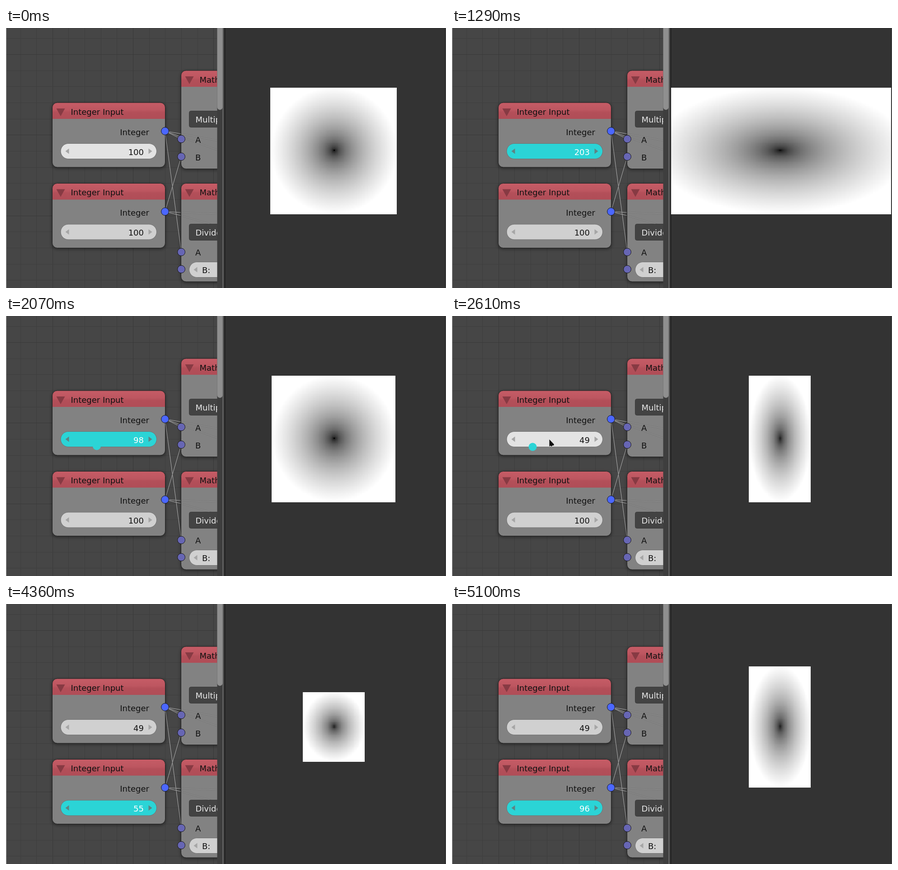
An HTML page with a canvas for the animation above (5.15 s loop, 974x575 px).

```html
<!DOCTYPE html>
<html>
<head>
<meta charset="utf-8">
<title>Node editor</title>
<style>
html, body { margin: 0; width: 100%; height: 100%; overflow: hidden; background: #333; }
svg, canvas { position: absolute; top: 0; left: 0; display: block; }
canvas { left: 485px; }
text { font: 18px "DejaVu Sans", sans-serif; fill: #111; }
</style>
</head>
<body>
<svg id="stage" width="974" height="575" viewBox="0 0 974 575">
  <defs>
    <linearGradient id="head" x1="0" y1="0" x2="0" y2="1">
      <stop offset="0" stop-color="#c65c66"/>
      <stop offset=".45" stop-color="#bd5660"/>
      <stop offset=".6" stop-color="#b34f59"/>
      <stop offset="1" stop-color="#b04d57"/>
    </linearGradient>
    <filter id="soft" x="-10%" y="-10%" width="120%" height="120%"><feGaussianBlur stdDeviation="3"/></filter>
    <clipPath id="pane"><rect width="468" height="575"/></clipPath>
  </defs>
  <rect width="974" height="575" fill="#333"/>
  <g id="editor" clip-path="url(#pane)"></g>
  <g id="frame">
    <rect x="467.5" width="12.500" height="575" fill="#3e3e3e"/>
    <path d="M467.500 0H479.500V175a6 6 0 0 1-12 0Z" fill="#8f8f8f"/>
    <rect x="479.5" width="1.500" height="575" fill="#777"/>
    <rect x="481" width="3" height="575" fill="#3c3c3c"/>
    <rect x="484" width="1" height="575" fill="#0c0c0c"/>
    <rect width="1" height="575" fill="#aaa"/>
    <rect x="972" width="1" height="575" fill="#161616"/>
    <rect x="973" width="1" height="575" fill="#666"/>
  </g>
</svg>
<canvas id="view" width="487" height="575"></canvas>
<script>
const LOOP = 5150, CELL = 2.795, CYAN = '#2bd4d6';
const editor = document.getElementById('editor');
const view = document.getElementById('view').getContext('2d');
const buffer = document.createElement('canvas');
const pixels = buffer.getContext('2d');

function add(tag, attrs, text) {
  const el = document.createElementNS('http://www.w3.org/2000/svg', tag);
  for (const k in attrs) el.setAttribute(k, attrs[k]);
  if (text) el.textContent = text;
  editor.appendChild(el);
  return el;
}
const label = (x, y, text, more) => add('text', { x, y, ...more }, text);
const shape = (d, more) => add('path', { d, ...more });

function drawGrid() {
  add('rect', { width: 468, height: 575, fill: '#464646' });
  for (let i = 0; i < 16; i++) {
    const x = Math.round(31.5 + i * 35.65) + .5, y = Math.round(22.5 + i * 35.65) + .5;
    shape(`M${x} 0V575`, { stroke: i % 5 == 2 ? '#393939' : '#3e3e3e' });
    shape(`M0 ${y}H468`, { stroke: i % 5 == 1 ? '#393939' : '#3e3e3e' });
  }
}

function drawNode(x, y, w, h, title) {
  add('rect', { x: x - 1, y: y + 1, width: w + 2, height: h + 2, rx: 12, fill: '#000', opacity: .4, filter: 'url(#soft)' });
  add('rect', { x, y, width: w, height: h, rx: 11, fill: '#828282' });
  shape(`M${x} ${y + 36}V${y + 11}a11 11 0 0 1 11-11H${x + w - 11}a11 11 0 0 1 11 11V${y + 36}Z`, { fill: 'url(#head)' });
  add('rect', { x, y, width: w, height: h, rx: 11, fill: 'none', stroke: '#222', 'stroke-width': 1 });
  shape(`M${x + 9} ${y + 13}h19l-9.5 17Z`, { fill: '#873a43' });
  label(x + 41, Math.floor(y + 27), title);
}

function drawLinks(ends, color) {
  for (const [x1, y1, x2, y2] of ends) {
    const d = `M${x1} ${y1}L${x2} ${y2}`;
    shape(d, { stroke: '#222', 'stroke-width': 2.4, opacity: .2 });
    shape(d, { stroke: color, 'stroke-width': 1 });
  }
}

function drawField(y, base) {
  const box = add('rect', { x: 121, y: y - 17, width: 212.5, height: 34, rx: 17, stroke: '#707070' });
  const arrows = shape(`M131.500 ${y}l8-6v12ZM323.500 ${y}l-8-6v12Z`);
  const num = label(305, base, '100', { 'text-anchor': 'end' });
  return { box, arrows, num };
}

function dropdown(y, base, text) {
  add('rect', { x: 405.5, y, width: 90, height: 36, rx: 4, fill: '#434343', stroke: '#3a3a3a' });
  label(419.5, base, text, { style: 'fill:#e8e8e8' });
}

const socket = (cx, cy, fill) => add('circle', { cx, cy, r: 8.4, fill, stroke: '#151515' });

drawGrid();
drawLinks([[352, 228, 388, 245.5], [352, 228, 388, 495.5], [352, 406, 388, 284.5],
  [352, 228, 388, 234], [352, 228, 388, 241], [352, 406, 388, 408], [352, 406, 388, 415]], '#bababa');
drawNode(102.5, 165, 250, 143, 'Integer Input');
drawNode(102.5, 343.5, 250, 143, 'Integer Input');
drawNode(387.5, 94, 120, 217.5, 'Math');
drawNode(387.5, 343.5, 120, 217.5, 'Math');
drawLinks([[388, 234, 468, 249], [388, 241, 468, 270], [388, 408, 468, 411], [388, 415, 468, 438]], '#9b9b9b');
label(317, 237, 'Integer', { 'text-anchor': 'end' });
label(317, 415, 'Integer', { 'text-anchor': 'end' });
dropdown(183.5, 209, 'Multiply');
dropdown(433.5, 459, 'Divide');
label(419, 254, 'A');
label(419, 293, 'B');
label(419, 503, 'A');
add('rect', { x: 405.5, y: 517.5, width: 120, height: 34, rx: 17, fill: '#d0d0d0', stroke: '#707070' });
shape('M415.500 534.500l8-6v12Z', { fill: '#a6a6a6' });
label(434, 542, 'B:');
socket(352, 228, '#4b67ff');
socket(352, 406, '#4b67ff');
for (const y of [245.5, 284.5, 495.5, 533.5]) socket(388, y, '#6766b4');

const fields = [drawField(272.5, 281), drawField(451, 459)];
const dot = add('circle', { r: 9, fill: CYAN });
editor.insertBefore(dot, fields[0].arrows);
const cursor = shape('M0 0L11 11.500V14.500L7 15L5.500 17.500L3 15L0 17.500Z', { fill: '#111', stroke: '#f4f4f4', 'stroke-width': .8 });

// Piecewise linear value from [time, value] keys
function track(t, keys) {
  if (t <= keys[0][0]) return keys[0][1];
  for (let i = 1; i < keys.length; i++) {
    const [a, u] = keys[i - 1], [b, v] = keys[i];
    if (t < b) return u + (v - u) * (t - a) / (b - a);
  }
  return keys[keys.length - 1][1];
}

// Value that moves in n equal time steps from a to b
function steps(t, a, b, n, from, to, ease) {
  const i = Math.min(n - 1, Math.floor((t - a) / (b - a) * (n - 1) + 1e-6));
  return Math.round(from + (to - from) * ease(i / (n - 1)));
}
const linear = p => p;

function widthAt(t) {
  if (t < 510) return 100;
  if (t < 650) return 101;
  if (t < 1290) return steps(t, 650, 1130, 9, 103, 205, p => p ** 1.888);
  if (t < 1850) return steps(t, 1290, 1730, 12, 203, 136, linear);
  if (t < 2410) return steps(t, 1850, 2360, 13, 132, 51, linear);
  return 49;
}

function heightAt(t) {
  if (t < 3580) return 100;
  if (t < 4040) return 102;
  if (t < 4610) return steps(t, 4040, 4510, 9, 98, 42, p => 1 - (1 - p) ** 1.49);
  return steps(t, 4610, 5100, 11, 44, 96, linear);
}

function setField(f, value, mode) {
  const active = mode == 'active';
  f.box.setAttribute('fill', active ? CYAN : mode == 'hover' ? '#e3e3e3' : '#d0d0d0');
  f.arrows.setAttribute('fill', active ? '#5d8484' : '#a6a6a6');
  f.num.style.fill = active ? '#fff' : '#111';
  f.num.textContent = value;
}

const toScreen = v => v <= .0031308 ? 12.92 * v : 1.055 * v ** (1 / 2.4) - .055;

let shown = '';
function drawImage(w, h) {
  if (shown == w + 'x' + h) return;
  shown = w + 'x' + h;
  buffer.width = w;
  buffer.height = h;
  const img = pixels.createImageData(w, h);
  for (let y = 0, p = 0; y < h; y++)
    for (let x = 0; x < w; x++, p += 4) {
      const r = Math.hypot(2 * x / w - 1, 2 * (h - 1 - y) / h - 1);
      img.data[p] = img.data[p + 1] = img.data[p + 2] = 255 * toScreen(Math.min(1, r));
      img.data[p + 3] = 255;
    }
  pixels.putImageData(img, 0, 0);
  view.clearRect(0, 0, 487, 575);
  view.imageSmoothingEnabled = false;
  view.drawImage(buffer, 240.2 - w * CELL / 2, 272.2 - h * CELL / 2, w * CELL, h * CELL);
}

function render(t) {
  const w = widthAt(t), h = heightAt(t);
  const s = 2610 + Math.floor((t - 2610) / 40.84 + 1e-6) * 40.84;
  const k = track(s, [[2610, 0], [2700, .06], [2980, .86], [3100, .99], [3150, 1]]);
  const cx = 215 + 13 * k, cy = 272 + 181 * k;
  const pointing = t >= 2610 && t < 3190;

  const first = t < 200 || (pointing && cy < 290) ? 'hover' : t < 2610 ? 'active' : '';
  const second = t >= 3190 ? 'active' : pointing && cy > 434 ? 'hover' : '';
  setField(fields[0], w, first);
  setField(fields[1], h, second);

  dot.setAttribute('visibility', t >= 1290 && t < 2650 ? 'visible' : 'hidden');
  dot.setAttribute('cx', track(t, [[1290, 275], [1730, 232.5], [1810, 221], [2360, 178.5]]));
  dot.setAttribute('cy', track(t, [[1290, 276], [1730, 285], [2360, 289.5]]));
  cursor.setAttribute('visibility', pointing ? 'visible' : 'hidden');
  cursor.setAttribute('transform', `translate(${cx} ${cy})`);
  drawImage(w, h);
}

let start;
function tick(now) {
  if (start === undefined) start = now;
  render((now - start) % LOOP);
  requestAnimationFrame(tick);
}
render(0);
requestAnimationFrame(tick);
</script>
</body>
</html>
```
